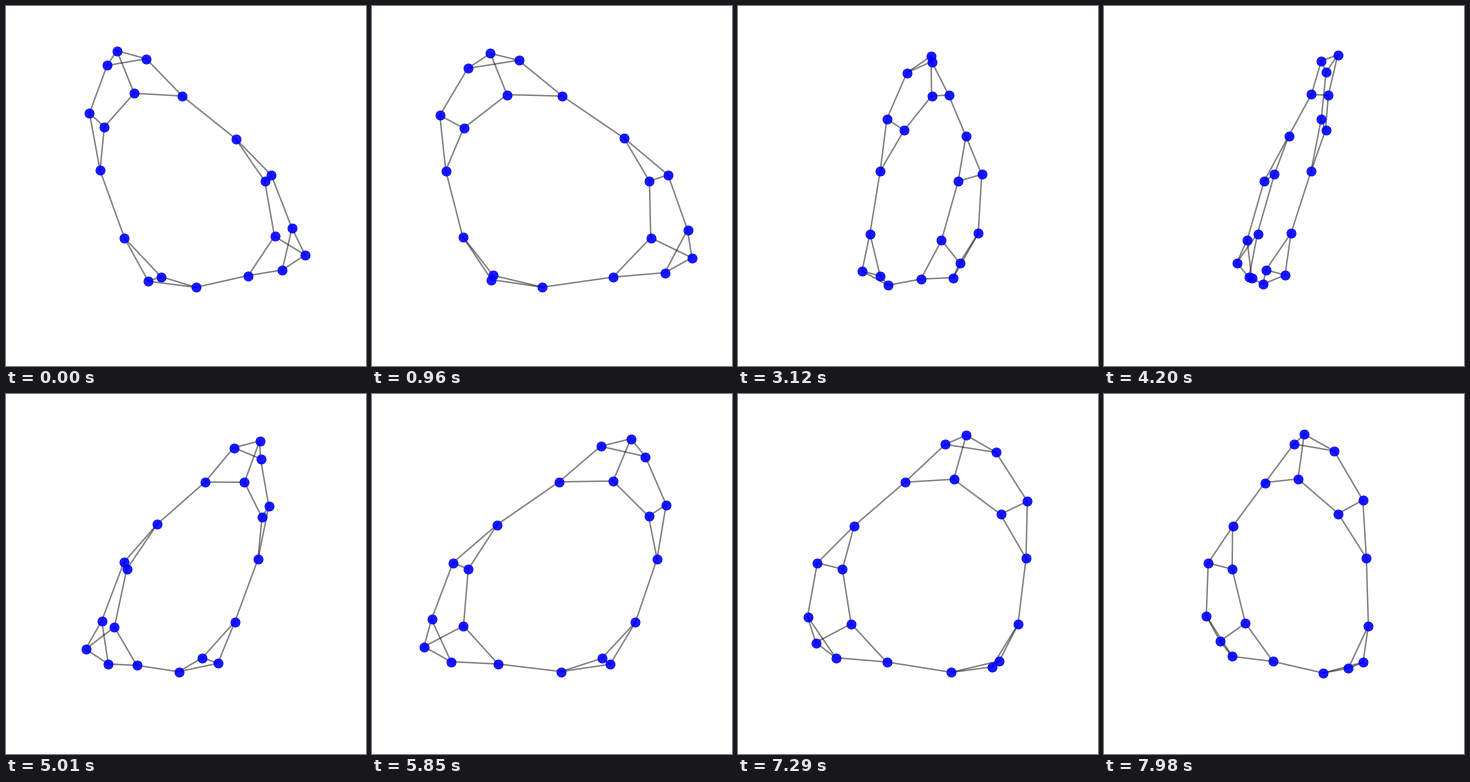
Recreate the animation shown at these times as a matplotlib script. Size 360 px wide and 360 px high, loop 8000 ms.

```python
import numpy as np
import matplotlib.pyplot as plt
from matplotlib.animation import FuncAnimation
from matplotlib.collections import LineCollection

SIZE, DPI = 360, 72
LOOP, TICK, STEP = 8000, 10, 30      # ms; the view turns one degree per STEP
CENTER = np.array([184.9, 175.1])
DIST = 1946                          # camera distance in pixels

# A ring of 20 nodes: one cluster, its turned copy and a small diamond.
# Columns are side, depth and height around the vertical axis.
CLUSTER = np.array([
    (-87.7, -68.2, 10.5), (-84.7, -41.4, 53.2), (-98.1, -63.7, 65.7),
    (-82.2, -37.7, 113.4), (-44.6, -1.8, 122.2), (-73.6, -9.6, 129.7),
    (-56.6, -4.9, 87.6), (-8.7, 24.4, 86.1),
])
TURN = np.array([(-0.82, 0.424, 0.494),
                 (-0.066, -0.793, 0.484),
                 (-0.624, -0.34, -0.765)])
SHIFT = np.array([-2.3, -10.5, -26.3])
DIAMOND = np.array([(4.9, -34.8, -104.3), (-41.4, -55.6, -97.3),
                    (-28.8, -71.4, -92.1), (-64.0, -72.8, -54.7)])
NODES = np.vstack([CLUSTER, CLUSTER @ TURN.T + SHIFT, DIAMOND])

# every node has two ring neighbours and one chord inside its group
CLUSTER_CHORDS = [(0, 2), (1, 6), (3, 5), (4, 7)]
DIAMOND_CHORDS = [(0, 2), (1, 3)]
GROUPS = [(0, CLUSTER_CHORDS), (8, CLUSTER_CHORDS), (16, DIAMOND_CHORDS)]

COUNT = len(NODES)
ring = [(i, (i + 1) % COUNT) for i in range(COUNT)]
chords = [(s + i, s + j) for s, pairs in GROUPS for i, j in pairs]
EDGES = np.array(ring + chords)


def project(angle):
    """Screen positions of all nodes seen from the given angle."""
    a, b, z = NODES.T
    c, s = np.cos(angle), np.sin(angle)
    scale = 1 / (1 - (a * s - b * c) / DIST)
    return CENTER + np.column_stack([(a * c + b * s) * scale, -z * scale])


fig = plt.figure(figsize=(SIZE / DPI, SIZE / DPI), dpi=DPI, facecolor="white")
ax = fig.add_axes([0, 0, 1, 1])
ax.set(xlim=(0, SIZE), ylim=(SIZE, 0))
ax.axis("off")

start = project(0)
lines = LineCollection(start[EDGES], colors="black", alpha=0.5,
                       linewidths=1.5, capstyle="projecting", zorder=1)
ax.add_collection(lines)
dots = ax.scatter(*start.T, s=80, c="blue", edgecolors="blue",
                  linewidths=1, alpha=0.9, zorder=2)


def update(frame):
    points = project(np.radians(frame * TICK // STEP))
    lines.set_segments(points[EDGES])
    dots.set_offsets(points)
    return lines, dots


anim = FuncAnimation(fig, update, frames=LOOP // TICK, interval=TICK,
                     repeat=True, repeat_delay=0, blit=False)
plt.show()
```
